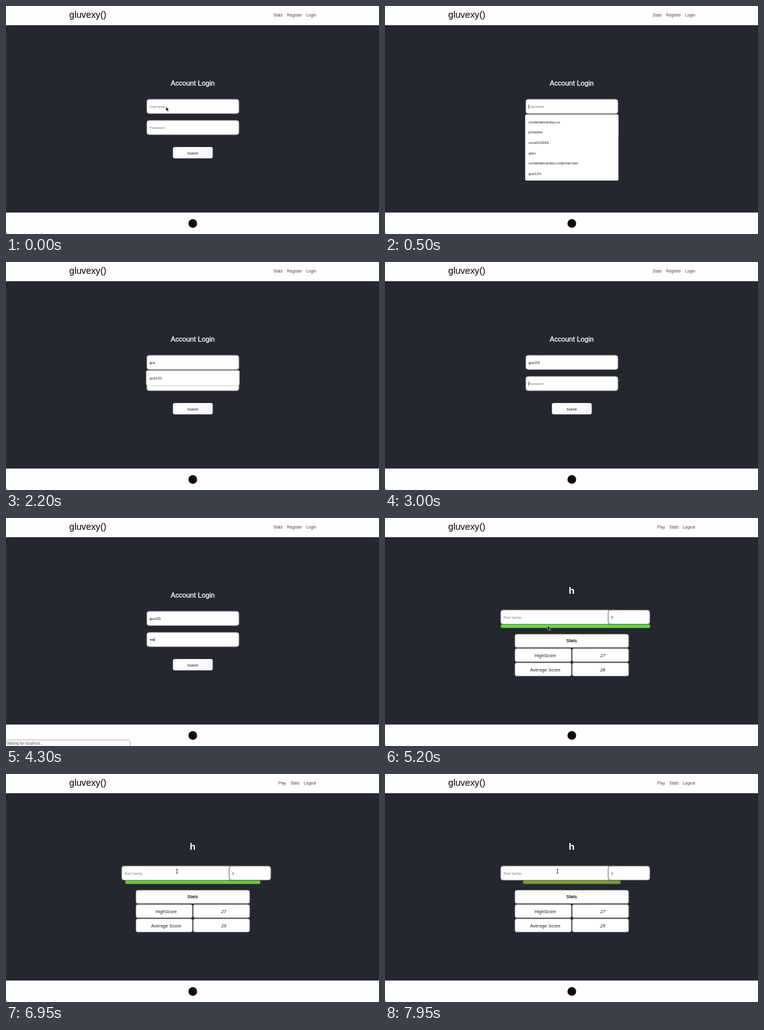
An HTML page that plays this animation: 600 px wide and 367 px high, repeating every 8 s.

```html
<!DOCTYPE html>
<html lang="en">
<head>
<meta charset="utf-8">
<title>Typing game login</title>
<style>
  html, body { margin: 0; width: 100%; height: 100%; overflow: hidden; background: #fff; }
  svg { display: block; width: 100%; height: 100%; }
  text { font-family: "Liberation Sans", Arial, sans-serif; white-space: pre; }
  .ui { font-family: Inter, "Liberation Sans", sans-serif; }
  .box { fill: #fff; stroke: #73737a; stroke-width: .9; }
  .cell { fill: #fff; stroke: #85858b; stroke-width: .7; }
  .hint { fill: #757575; }
  .mid { text-anchor: middle; }
  .caret { stroke: #111; stroke-width: .7; }
</style>
</head>
<body>
<svg viewBox="0 0 600 367" preserveAspectRatio="none">
  <defs>
    <linearGradient id="sheen" x2="1" y2="1">
      <stop offset=".4" stop-color="#fff"/><stop offset="1" stop-color="#f1effb"/>
    </linearGradient>
    <filter id="soft" x="-10%" y="-40%" width="120%" height="180%">
      <feDropShadow dx="0" dy=".5" stdDeviation="1" flood-opacity=".4"/>
    </filter>
  </defs>

  <rect width="600" height="367" fill="#fff"/>
  <rect y="31" width="600" height="301.5" fill="#24272f"/>
  <rect y="31" width="600" height="1" fill="#20282a"/>
  <text x="101.7" y="19.3" font-size="14.75">gluvexy()</text>
  <circle cx="300.5" cy="350" r="7" fill="#0b0b0b"/>
  <rect y="366" width="1" height="1" fill="#333"/>

  <g id="login">
    <g font-size="6.5" fill="#444">
      <text x="430.3" y="17">Stats</text>
      <text x="452" y="17">Register</text>
      <text x="483" y="17">Login</text>
    </g>
    <text class="mid" x="300.4" y="128" font-size="11.2" fill="#fff" stroke="#fff" stroke-width=".3">Account Login</text>
    <rect class="box" x="226.3" y="150" width="148.6" height="23.3" rx="4"/>
    <rect class="box" x="226.3" y="184" width="148.6" height="23.3" rx="4"/>
    <rect x="268.5" y="227" width="64" height="18.3" rx="3" fill="url(#sheen)"/>
    <g font-size="5.4">
      <text class="mid" x="300.4" y="238.5">Submit</text>
      <text id="user" x="231" y="164"></text>
      <text id="passHint" class="hint" x="231" y="198">Password</text>
    </g>
    <g id="dots"></g>
    <g id="menu" filter="url(#soft)">
      <rect id="panel" x="225.5" y="174.5" width="150" height="106.5" rx="2" fill="#fff"/>
      <g id="items" class="ui" font-size="6.1" fill="#222"></g>
    </g>
  </g>

  <g id="game">
    <g font-size="6.5" fill="#444">
      <text x="437.8" y="17">Play</text>
      <text x="457.4" y="17">Stats</text>
      <text x="479" y="17">Logout</text>
    </g>
    <text id="word" class="mid" x="300.3" y="122" font-size="15.5" font-weight="bold" fill="#fff">h</text>
    <rect id="bar" y="171.3" height="5.6" rx="2.6" stroke-width=".6"/>
    <rect class="box" x="186" y="148" width="190" height="23" rx="4"/>
    <rect class="box" x="359" y="148" width="67.2" height="23" rx="4" style="stroke:#4a4a52"/>
    <text id="entry" x="190.5" y="162" font-size="5.55"></text>
    <text id="score" x="363.7" y="162" font-size="5.4"></text>
    <rect class="cell" x="209" y="187" width="183" height="21.4" rx="3"/>
    <g id="cells"></g>
    <text class="mid" x="300.4" y="200.3" font-size="7.1" font-weight="bold" fill="#222">Stats</text>
    <g class="mid" font-size="7.4" fill="#222">
      <text x="257.7" y="223.5">HighScore</text>
      <text x="257.7" y="246.5">Average Score</text>
      <g font-style="italic">
        <text x="350.3" y="223.5">27</text>
        <text id="average" x="350.3" y="246.5"></text>
      </g>
    </g>
  </g>

  <g id="status">
    <path d="M-2 357.5H197q2.5 0 2.5 2.5V369H-2Z" fill="#fafafa" stroke="#bbb" stroke-width=".7" filter="url(#soft)"/>
    <text class="ui" x="1" y="364.5" font-size="5.6" fill="#555">Waiting for localhost...</text>
  </g>
  <path id="caret" class="caret" d="M0 0V6.6"/>
  <path id="arrow" d="M0 0V7.2L1.7 5.7L2.9 8.3L4 7.8L2.9 5.3H5.1Z" fill="#000" stroke="#fff" stroke-width=".5"/>
  <path id="beam" d="M-1.5 -3.4Q0 -3.4 0 -2.4Q0 -3.4 1.5 -3.4M0 -2.6V2.6M-1.5 3.4Q0 3.4 0 2.4Q0 3.4 1.5 3.4" fill="none" stroke="#111" stroke-width=".8"/>
</svg>
<script>
const LOOP = 8000, NS = "http://www.w3.org/2000/svg";
const $ = id => document.getElementById(id);
const show = (id, on) => $(id).style.display = on ? "" : "none";
const place = (id, x, y) => $(id).setAttribute("transform", `translate(${x} ${y})`);
const set = (el, attrs) => { for (const k in attrs) el.setAttribute(k, attrs[k]); };
const add = (parent, tag, attrs, text = "") => {
  const el = document.createElementNS(NS, tag);
  set(el, attrs);
  el.textContent = text;
  $(parent).append(el);
  return el;
};
const ramp = (t, a, b) => Math.min(1, Math.max(0, (t - a) / (b - a)));
const ease = p => p * p * (3 - 2 * p);
const within = (t, a, b) => t >= a && t < b;

const NAME = "gus123";
const NAME_KEYS = [1450, 1700, 2200, 2500, 2650, 2950];
const PASS_KEYS = [3500, 3700, 3850];
const typed = (keys, t) => keys.filter(k => t >= k).length;

const accounts = ["cordeliabrantley.co", "jonasbw", "cora415263", "glen",
  "cordeliabrantley.co@mail.test", NAME];
const items = accounts.map((name, i) =>
  add("items", "text", { x: 231, y: 188.7 + i * 16.6 }, name));
const dots = PASS_KEYS.map((_, i) =>
  add("dots", "circle", { cx: 232.4 + i * 2.3, cy: 196.2, r: .9 }));
for (const y of [210, 233])
  for (const x of [209, 301.2])
    add("cells", "rect", { class: "cell", x, y, width: 90.8, height: 21.4, rx: 3 });

function drawCaret(on, x, y) {
  show("caret", on);
  place("caret", x, y);
}

function drawLogin(t) {
  const count = typed(NAME_KEYS, t), user = $("user");
  user.textContent = count ? NAME.slice(0, count) : "Username";
  user.setAttribute("class", count ? "" : "hint");

  // Only the last account matches once typing begins
  items.forEach((el, i) => {
    el.style.display = count && i < 5 ? "none" : "";
    el.setAttribute("y", count ? 188.7 : 188.7 + i * 16.6);
  });
  $("panel").setAttribute("height", count ? 23.8 : 106.5);
  show("menu", within(t, 300, 3000));
  $("menu").style.opacity = ramp(t, 250, 450);

  const marks = typed(PASS_KEYS, t);
  dots.forEach((el, i) => el.style.display = i < marks ? "" : "none");
  show("passHint", !marks);

  if (t < 3000) {
    const width = count ? user.getComputedTextLength() : 0;
    const on = within(t, 250, 1000) || within(t, 1450, 2200) || t >= 2300;
    drawCaret(on, 231.3 + width, 158.5);
  } else {
    drawCaret(t < 3450 || marks > 0, 231.4 + marks * 2.4, 192.5);
  }
}

function drawGame(t) {
  const played = t >= 6000, typing = within(t, 6000, 6050);
  show("word", t >= 4700 && !typing);
  $("entry").textContent = typing ? "h" : "Start typing...";
  $("entry").setAttribute("class", typing ? "" : "hint");
  $("score").textContent = played ? 1 : 0;
  $("average").textContent = played ? 29 : 28;

  // The bar stays at the left edge until it fits its 229 px column, then centres
  const lost = 120.2 * (1 - Math.cos(Math.PI * ramp(t, 5950, 10950)));
  const width = 240.4 - lost;
  const tint = k => `rgb(${(92 + lost * .37) * k},${(226 - lost * .79) * k},${(46 - lost * .1) * k})`;
  set($("bar"), { x: Math.max(186, 300.5 - width / 2), width, fill: tint(1), stroke: tint(.72) });

  drawCaret(within(t, 4550, 5050) || within(t, 6050, 6500) || within(t, 7000, 7500), 190.5, 157);
}

function drawPointer(t) {
  let x = 257.3, y = 162;
  if (t >= 4350) {
    const a = ease(ramp(t, 4700, 5200)), b = ease(ramp(t, 5200, 5500));
    const c = ramp(t, 7700, 7900);
    x = 420.5 - 159 * a + 13.5 * b + 2.5 * c;
    y = 164 + 9 * a - 16.5 * b;
  }
  const beam = t > 5200 && y < 171;
  show("arrow", (t < 500 || t >= 4550) && !beam);
  show("beam", beam);
  place("arrow", x, y);
  place("beam", x, y);
}

function draw(t) {
  const login = t < 4350;
  show("login", login);
  show("game", !login);
  show("status", within(t, 4250, 4900));
  (login ? drawLogin : drawGame)(t);
  drawPointer(t);
}

function tick() {
  draw(performance.now() % LOOP);
  requestAnimationFrame(tick);
}
tick();
</script>
</body>
</html>
```
